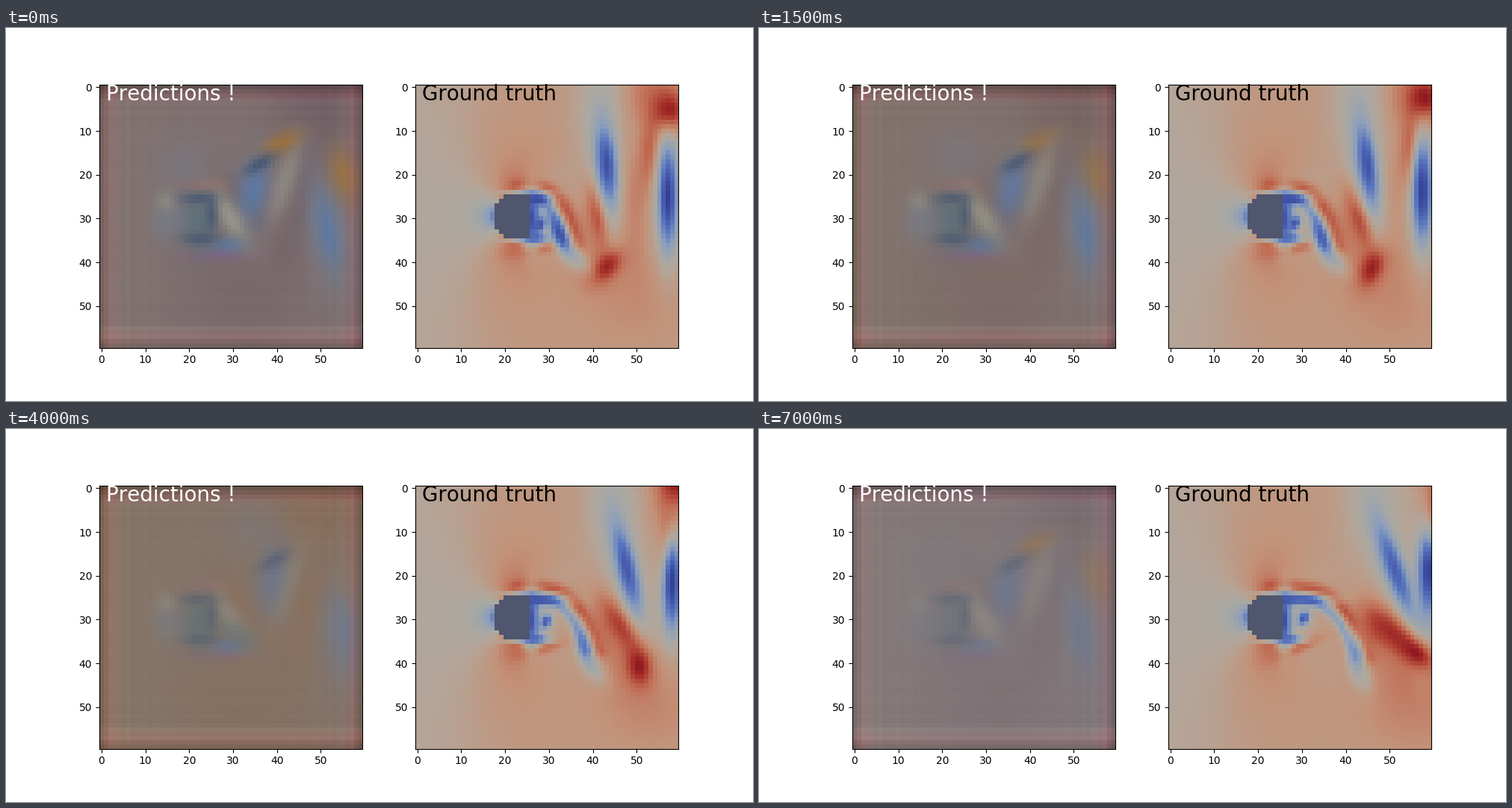
A matplotlib script for the animation above (7500 ms loop, 1000 by 500 pixels).

```python
import numpy as np
import matplotlib.pyplot as plt
from matplotlib.animation import FuncAnimation

plt.rcParams["text.kerning_factor"] = 6

SIZE = 60
FRAMES = 15
INTERVAL = 500
Y, X = np.mgrid[0:SIZE, 0:SIZE].astype(float)

# Muted blue - grey - red scale for the velocity field
STOPS = [-1, -0.6, -0.3, 0, 0.13, 0.35, 0.6, 0.8, 1]
COLORS = np.array([
    (48, 60, 148), (88, 116, 190), (138, 158, 188), (170, 168, 162),
    (180, 165, 152), (194, 146, 121), (192, 108, 83), (172, 58, 47),
    (135, 10, 26)])

DISC = (np.hypot(X - 22.5, Y - 29.5) < 5.2) & (X < 26)
DISC_COLOR = (80, 86, 109)

BLUE, TEAL, NAVY = (90, 121, 166), (88, 112, 123), (66, 84, 112)
ORANGE, BROWN, MAUVE = (158, 113, 56), (141, 107, 80), (110, 92, 99)
PALE, ROSE, PURPLE = (154, 153, 138), (152, 108, 102), (130, 96, 136)
HAZE = (118, 126, 140)


def paint(img, mask, value):
    mask = mask[..., None]
    img += mask * (np.asarray(value, float) - img)


def lobe(img, value, x, y, length, width, tilt=0, strength=1.0):
    """Soft ellipse; tilt in degrees turns its long axis from down to right."""
    t = np.radians(tilt)
    along = (X - x) * np.sin(t) + (Y - y) * np.cos(t)
    across = (X - x) * np.cos(t) - (Y - y) * np.sin(t)
    paint(img, strength * np.exp(-(along / length) ** 2
                                 - (across / width) ** 2), value)


def sheet(img, value, top, reach, drop, width, strength=1.0):
    """Shear layer leaving the disc level and curling down at its end."""
    u = np.linspace(0, 1, 40)
    px, py = 23 + (reach - 23) * u, top + drop * u ** 4
    d2 = ((X[..., None] - px) ** 2 + (Y[..., None] - py) ** 2).min(axis=2)
    paint(img, strength * np.exp(-d2 / width ** 2), value)


def free_stream():
    """Speed around a cylinder, without the slow zone behind it."""
    dx, dy = X - 22.5, Y - 29.5
    r2 = np.maximum(dx ** 2 + dy ** 2, 20)
    c = (dy ** 2 - dx ** 2) / r2
    c = np.where(dx > 0, np.maximum(c, 0), c)
    ratio = 5 / np.sqrt(r2)
    bump = np.where(c > 0, 0.6 * c * ratio ** 1.4, 0.85 * c * ratio ** 2)
    return 0.12 + 0.13 / (1 + np.exp((13 - X) / 4)) + bump


def truth(n):
    k = n / (FRAMES - 1)
    v = free_stream()[..., None]

    # broad warm and grey zones
    lobe(v, 0.45 + 0.1 * k, 50 + 6 * k, 47, 14, 14, 0, 0.75)
    lobe(v, 0.5 + 0.15 * k, 42 + 15 * k, 39, 8, 8, 0, 0.8)
    lobe(v, 0.45 + 0.27 * k, 39 + 8 * k, 32, 6, 5.5, 0, 0.85)
    lobe(v, 0, 43 + 4 * k, 3, 12, 6.5, 0, 0.95)
    lobe(v, 0.55 - 0.45 * k, 48 + 9 * k, 26, 13, 4.5 - 2 * k, 0, 0.9)

    # halos of the shed vortices
    lobe(v, -0.25, 43 + 8 * k, 19, 15, 3.8, 5 + 17 * k, 0.95)
    lobe(v, -0.12, 57 + 1.6 * k, 25 - 5 * k, 16, 3.7)

    # red streaks, drifting to the right
    lobe(v, 0.62, 54 + 7 * k, 2, 8, 7 - 3 * k, 0, 0.9)
    lobe(v, 0.66, 52.5 + 8 * k, 14 - 8 * k, 10, 2.1, -5, 0.95)
    lobe(v, 0.98, 57.2 + 3 * k, 5.5 - 13 * k, 4.5, 3.5)
    lobe(v, 0.72 + 0.15 * k, 40.8 + 9.5 * k, 30 + 3 * k,
         8, 2.1 + k, 10 + 38 * k, 0.95)
    lobe(v, 0.9 + 0.08 * k, 43 + 13 * k, 41 + 3 * k - 6.5 * k * k,
         4.6, 2.8, 90 * k - 45)

    # shear layers and near wake
    sheet(v, 0.72, 22.6, 36.5 + 8.5 * k, 13 + 3 * k, 1.7, 0.95)
    lobe(v, 0.7, 27 + 1.5 * k, 37 - 0.5 * k, 6, 1.4, 100 + 12 * k, 0.9)
    sheet(v, -0.35, 25.2, 33 + 9 * k, 10 + 3 * k, 1.2, 0.95)
    for edge in (24, 35):
        lobe(v, 0, 24, edge, 6, 0.6, 90, 0.9)
    lobe(v, -0.95, 26, 30, 6, 2.2 - 0.5 * k)
    lobe(v, -0.95, 27.5 + 2 * k, 25.6, 3 + 3 * k, 1.2, 90)
    lobe(v, -0.75, 27, 34.4, 3, 0.9, 90)
    lobe(v, -0.1, 28.3 + 1.2 * k, 30.5 - k, 3.2, 2.4, 0, 0.3 + 0.6 * k)
    lobe(v, -0.85, 27.8 + 2.6 * k, 31.5 - 1.8 * k, 1.7, 1.2, -25)

    # vortex cores
    lobe(v, 0, 36 + 7.5 * k, 39 + 4 * k, 4, 2.2, 45 - 25 * k, 0.9)
    lobe(v, 0.45 * k - 0.85, 32.3 + 9.8 * k, 33.5 + 4.5 * k,
         5 - k, 1.8, 25 - 20 * k)
    lobe(v, 0.1 * k - 0.85, 43 + 8 * k, 17.5 + k, 8 + 2 * k, 2, 5 + 14 * k)
    lobe(v, -0.97, 57 + 1.6 * k, 25 - 6 * k, 11 - 2 * k, 2)

    rgb = np.stack([np.interp(v[..., 0], STOPS, COLORS[:, c])
                    for c in range(3)], axis=2)
    rgb[DISC] = DISC_COLOR
    return rgb


def add_borders(img):
    """Dark rim and reddish ring on every side, with faint bands inside."""
    bands = np.random.RandomState(4).uniform(-4, 4, (2, SIZE))
    low = np.arange(SIZE)
    for side, d in enumerate((low, SIZE - 1 - low)):
        rim = -22 * np.exp(-d ** 2.0)
        ring = np.exp(-(d - 1.8) ** 2 / 2)
        line = (rim + bands[side] * np.exp(-d / 8))[:, None]
        line = line + ring[:, None] * (8, -6, -2)
        img += line[None] + line[:, None]
    img[:3] -= 9
    img[-5:] += (8, 7, 5)


def prediction(n):
    k = n / (FRAMES - 1)
    s = np.sin(np.pi * k ** 1.6)
    soft = 1 - 0.3 * s
    bg = np.zeros((SIZE, SIZE, 3)) + (126, 112, 112)
    bg += k ** 3 * np.array((3, 7, 9)) + s * np.array((5, 1, -12))
    bg += np.exp(-X / 9)[..., None] * (6, 6, 0)
    img = bg.copy()
    tint = (1 - s) * np.array(MAUVE) + s * np.array(BROWN)

    # wide tints
    lobe(img, tint, 32, 46, 14, 14, 0, 0.4)
    lobe(img, tint, 48, 6, 8, 9, 0, 0.75)
    lobe(img, tint, 47 + 2 * s, 22, 18, 4, -15, 0.75)
    lobe(img, tint, 33, 27, 11, 3, 45, 0.5)
    lobe(img, HAZE, 19 + 16 * s, 18 - 9 * s, 6, 6, 0, 0.4)

    # far wake
    lobe(img, HAZE, 51 + 3.5 * s, 31, 15, 5, 10 - 8 * s, 0.75)
    lobe(img, BLUE, 51.5 + 3.8 * s, 33, 8, 2.6, 10 - 8 * s, 0.8 - 0.35 * s)
    lobe(img, ORANGE, 55, 20, 6, 3.2, 15, 0.75 * (1 - 0.8 * s))
    lobe(img, PALE, 41.5 + s, 22, 10, 2.4, -18, 0.55 * soft)

    # middle vortex
    lobe(img, ORANGE, 40.5, 13, 5.5, 2.3, 115, 0.9 * (1 - s))
    lobe(img, BLUE, 34.5 + 4.5 * s, 23.5 - 3 * s, 8, 3.5, -10, 0.9 * soft)
    lobe(img, NAVY, 36 + 3.5 * s, 17.5 - s, 3.8, 1.5, 120, 0.85 * soft)

    # body and near wake
    lobe(img, HAZE, 15.5, 30.5, 5, 4, 0, 0.7)
    lobe(img, PALE, 14.8, 26, 2.2, 2.2, 0, 0.5)
    lobe(img, ROSE, 23.5, 22.6, 4.5, 1.7, 90, 0.8)
    lobe(img, PURPLE, 26, 38.4, 7, 1.4, 90, 0.6 * soft)
    lobe(img, PALE, 29, 29.5, 7, 2.6, 32, 0.9 * soft)
    lobe(img, BLUE, 28.5, 36, 4, 1.8, 90, 0.75)
    lobe(img, TEAL, 28 + 3 * s, 33.5, 5, 2.5, 55, 0.6 * s)
    lobe(img, TEAL, 22.2, 30.5, 6.5, 4, 0, 0.85)
    for x, y, length, tilt in ((22, 25.4, 4, 90), (22.3, 34.6, 4, 90),
                               (25, 29, 4, 0)):
        lobe(img, NAVY, x, y, length, 1.3, tilt, 0.75 * soft)

    fade = 1 - 0.52 * k ** 1.5
    img = bg + fade * (img - bg)
    add_borders(img)
    return img


def to_bytes(img):
    return np.clip(np.rint(img), 0, 255).astype(np.uint8)


fig, (left, right) = plt.subplots(1, 2, figsize=(10, 5), dpi=100)
pred_im = left.imshow(to_bytes(prediction(0)))
true_im = right.imshow(to_bytes(truth(0)))
left.text(1, 3, "Predictions !", fontsize=20, color="white")
right.text(1, 3, "Ground truth", fontsize=20, color="black")


def update(n):
    pred_im.set_data(to_bytes(prediction(n)))
    true_im.set_data(to_bytes(truth(n)))
    return pred_im, true_im


anim = FuncAnimation(fig, update, frames=FRAMES, interval=INTERVAL,
                     repeat=True, repeat_delay=0)
plt.show()
```
